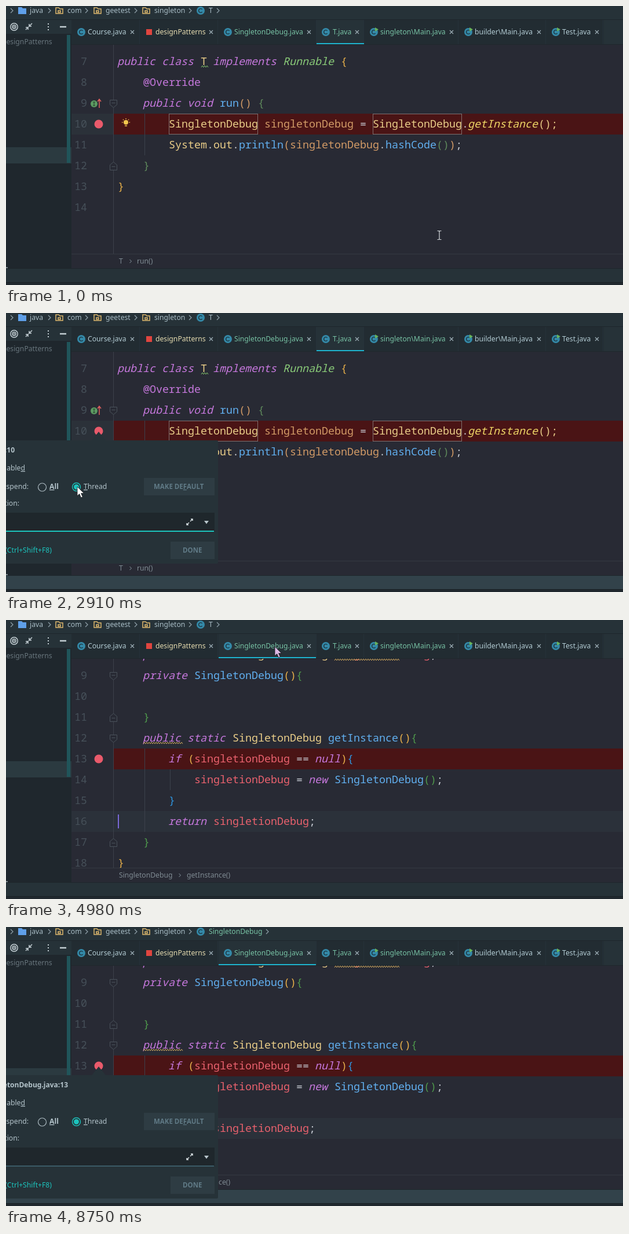
An HTML page that plays this animation: 1065x482 px, repeating every 8.93 s.

```html
<!DOCTYPE html>
<html lang="en">
<head>
<meta charset="utf-8">
<title>Breakpoint settings</title>
<style>
html, body { margin: 0; width: 100%; height: 100%; overflow: hidden; background: #282a34; }
svg { display: block; width: 1065px; height: 482px; }
text { font: 12.2px "Noto Sans", sans-serif; fill: #a9bdc6; white-space: pre; }
.code text { font: 18.333px "Noto Sans Mono", monospace; font-variant-ligatures: none; fill: #c8ccd4; }
.code .num { fill: #465059; text-anchor: end; }
.code .k { fill: #c678dd; }
.code .a { fill: #c678dd; }
.code .c { fill: #e9cd88; }
.code .i { fill: #efd666; }
.code .g { fill: #89ca78; }
.code .f { fill: #61afef; }
.code .r { fill: #e8616d; }
.code .o { fill: #d19a66; }
.code .y { fill: #e8b04a; }
.code .e { fill: #4f9a4c; }
.code .d { fill: #5f8a5c; }
.code .b { fill: #2f96e0; }
.code .k, .code .i, .code .g { font-style: italic; }
.wave, .line { fill: none; stroke-width: 1; }
.guide { stroke: #3c414b; }
.fold { fill: #282a34; stroke: #4a525b; }
.foot text { fill: #7f8b93; }
.popup text { fill: #b4c4cb; }
.popup .bold, .popup .button { font-weight: 700; }
.popup .button { fill: #607a86; font-size: 11.5px; }
.popup .end { text-anchor: end; }
.popup .link { fill: #1cc4bd; }
.under { text-decoration: underline; }
</style>
</head>
<body>
<svg viewBox="0 0 1065 482">
  <defs>
    <clipPath id="pane"><path d="M113 67H1065V428H113Z"/></clipPath>
    <g id="class">
      <circle r="7" fill="#3489a8"/>
      <path d="M2.6 -2.2A3.4 3.4 0 1 0 2.6 2.2" fill="none" stroke="#1d3540" stroke-width="1.4"/>
    </g>
    <path id="chevron" d="M-2 -4L2 0L-2 4" fill="none" stroke="#8b9ca5" stroke-width="1.3"/>
    <path id="folder" d="M-6 -5H-1L1 -3H6V5H-6ZM-2 0H2V3H-2Z" fill="none" stroke="#dcb66c" stroke-width="1.5"/>
    <path id="open" class="fold" d="M-6 -6H6V2L0 7L-6 2ZM-3 -1H3"/>
    <path id="shut" class="fold" d="M-6 7H6V-2L0 -7L-6 -2ZM-3 1H3"/>
    <circle id="point" r="7.5" fill="#e95a6b"/>
  </defs>

  <!-- window frame -->
  <rect width="1065" height="482" fill="#263238"/>
  <rect x="113" y="24" width="919" height="43" fill="#222c32"/>
  <rect x="113" y="67" width="952" height="386" fill="#282a34"/>
  <rect y="48" width="113" height="405" fill="#1f272d"/>
  <path d="M113 66.5H1065" stroke="#1f272c"/>
  <rect y="244" width="113" height="28" fill="#2b3a40"/>
  <rect x="105" y="50" width="6" height="221" fill="#20555a"/>
  <text x="-7" y="66" style="fill:#68767d">designPatterns</text>
  <path d="M0 23.5H1065M0 453.5H1065" stroke="#1e262b"/>
  <rect id="status" y="454" width="1065" height="23"/>
  <rect y="477" width="1065" height="5" fill="#20282e"/>
  <path d="M0 477.5H1065" stroke="#1b2226"/>
  <path d="M0 452H3" stroke="#7d898f" stroke-width="2"/>
  <g fill="none" stroke="#c3ced3" stroke-width="1.5">
    <circle cx="14" cy="36" r="6.2"/><circle cx="14" cy="36" r="3"/>
    <path d="M45 30L40 35V31M40 35H44M34 41L38 37V41M38 37H34"/>
    <path d="M73 30V32M73 35V37M73 40V42" stroke-width="2"/>
    <path d="M93 36H104" stroke-width="2.5"/>
  </g>
  <circle cx="14" cy="36" r="1.3" fill="#c3ced3"/>

  <!-- path bar -->
  <path d="M21 2H27L29 4H35V14H21Z" fill="#5f9fe8"/>
  <text x="41" y="12">java</text><text x="106" y="12">com</text>
  <text x="172" y="12">geetest</text><text x="256" y="12">singleton</text>
  <use href="#folder" x="92" y="8"/><use href="#folder" x="158" y="8"/><use href="#folder" x="242" y="8"/>
  <use href="#chevron" x="10" y="8"/><use href="#chevron" x="75" y="8"/><use href="#chevron" x="139" y="8"/>
  <use href="#chevron" x="224" y="8"/><use href="#chevron" x="318" y="8"/>
  <use href="#class" x="336" y="8"/>
  <g id="pathT"><text x="350" y="12">T</text><use href="#chevron" x="366" y="8"/></g>
  <g id="pathS"><text x="350" y="12" style="fill:#78c3a5">SingletonDebug</text><use href="#chevron" x="451" y="8"/></g>
  <g id="active">
    <rect y="24" width="100%" height="40" fill="#263238"/>
  </g>
  <g id="tabs"></g>
  <rect id="marker" y="64" height="2" fill="#1fb4cf"/>

  <!-- runnable class -->
  <g id="fileT">
    <g clip-path="url(#pane)">
      <rect x="113" y="186" width="73" height="36" fill="#2b3139"/>
      <rect x="186" y="186" width="879" height="36" fill="#4a1415"/>
      <path class="guide" d="M185.5 67V428M239.5 186V258"/>
      <use href="#open" x="185.5" y="168.5"/><use href="#shut" x="185.5" y="276.5"/>
      <circle cx="152" cy="169" r="6" fill="#5c9b62"/>
      <path d="M150 166H154M152 166V172M150 172H154" stroke="#24352a"/>
      <path d="M161 176V161M158 165L161 161L164 165" fill="none" stroke="#e0605f" stroke-width="1.5"/>
      <use id="pointT" href="#point" x="160" y="204"/>
      <g class="line" stroke="#80706f">
        <rect x="281.5" y="186.5" width="153" height="35"/><rect x="633.5" y="186.5" width="153" height="35"/>
      </g>
      <g class="code" id="codeT"></g>
    </g>
    <g id="bulb">
      <circle cx="207" cy="201" r="4" fill="#f3c74e"/>
      <path d="M205 207H209M207 194V195.500M200 201H201.500M212.500 201H214M202 196L203 197M212 196L211 197" stroke="#f3c74e" stroke-width="1.5"/>
    </g>
    <g class="foot">
      <text x="195" y="445">T</text><text x="226" y="445">run()</text>
      <use href="#chevron" transform="translate(215 441) scale(.75)"/>
    </g>
  </g>

  <!-- singleton class -->
  <g id="fileS">
    <g clip-path="url(#pane)">
      <rect x="186" y="222" width="879" height="36" fill="#4a1415"/>
      <rect x="113" y="330" width="952" height="36" fill="#2b313a"/>
      <path class="guide" d="M185.5 67V428M239.5 222V366M283.5 258V294"/>
      <use href="#open" x="185.5" y="96.5"/><use href="#shut" x="185.5" y="168.5"/>
      <use href="#open" x="185.5" y="204.5"/><use href="#shut" x="185.5" y="384.5"/>
      <use href="#point" x="160" y="240"/>
      <rect x="193" y="336" width="2" height="24" fill="#7a68d8"/>
      <g class="code" id="codeS"></g>
    </g>
    <g class="foot">
      <text x="195" y="445">SingletonDebug</text><text x="312" y="445">getInstance()</text>
      <use href="#chevron" transform="translate(300 441) scale(.75)"/>
    </g>
  </g>
  <path d="M113 428.5H1065" stroke="#343a42"/>

  <!-- breakpoint balloon -->
  <g id="popup" class="popup">
    <path d="M0 220H148L160 205L172 220H364Q366 220 366 222V431Q366 433 364 433H0Z" fill="#263238"/>
    <text id="title" class="bold end" y="241" style="font-size:12px"></text>
    <text class="end" x="33" y="272">Enable<tspan class="under">d</tspan></text>
    <text class="end" x="39" y="304">Suspend:</text>
    <text class="end" x="23" y="333">Condition:</text>
    <circle cx="62.500" cy="301" r="7" fill="none" stroke="#aebcc3" stroke-width="1.2"/>
    <text class="bold" x="75" y="304"><tspan class="under">A</tspan>ll</text>
    <circle id="glow" cx="121.500" cy="300.500" r="11" fill="#1b6e72"/>
    <circle cx="121.500" cy="300.500" r="7" fill="#263238" stroke="#1cc4bd" stroke-width="1.4"/>
    <circle cx="121.500" cy="300.500" r="4.500" fill="#1cc4bd"/>
    <text x="134" y="304"><tspan class="under">T</tspan>hread</text>
    <path d="M238 285H360V315H238ZM284 395H360V425H284Z" fill="#2e3c43"/>
    <text class="button" x="255" y="304">MAKE DE<tspan class="under">F</tspan>AULT</text>
    <text class="button" x="305" y="414">DONE</text>
    <rect y="345" width="360" height="32" fill="#1f272c"/>
    <rect id="field" y="376" width="359" height="2"/>
    <path d="M318 360L322 356M319 356H322V359M316 362L312 366M312 363V366H315" fill="none" stroke="#d5dde0" stroke-width="1.5"/>
    <path d="M342 359H350L346 364.500Z" fill="#b9c6cc"/>
    <text class="link end" x="79" y="414">More (Ctrl+Shift+F8)</text>
  </g>

  <g id="cursor">
    <circle id="ring" r="11.500" fill="#bda611" opacity=".9"/>
    <path id="arrow" d="M0 0V16L3.700 12.600L6.500 19L9.300 17.800L6.600 11.600H11.700Z" stroke="#15191c" stroke-width=".8"/>
    <path id="beam" d="M-3.500 -7.500H-1L0 -6.500L1 -7.500H3.500M0 -6.500V6.500M-3.500 7.500H-1L0 6.500L1 7.500H3.500" fill="none" stroke="#d6dade" stroke-width="1.2"/>
  </g>
</svg>
<script>
const LOOP = 8930;
const CHAR = 11;
const ITALIC = 'kig';
const $ = id => document.getElementById(id);

function set(id, attributes) {
  for (const name in attributes) $(id).setAttribute(name, attributes[name]);
}

// Each part of a row is a colour class letter followed by its text.
function row(first, n, indent, parts) {
  const y = 102 + (n - first) * 36;
  let x = 193 + indent * CHAR;
  let out = `<text class="num" x="140" y="${y}">${n}</text>`;
  for (const part of parts.split('|')) {
    const kind = part[0], word = part.slice(1);
    const lean = ITALIC.includes(kind) ? 1 : 0;
    out += `<text class="${kind}" x="${x - lean}" y="${y}">${word}</text>`;
    x += word.length * CHAR;
  }
  return out;
}

function wave(x, y, width, color) {
  const steps = 'l2 -3l2 3'.repeat(Math.round(width / 4));
  return `<path class="wave" stroke="${color}" d="M${x} ${y}${steps}"/>`;
}

$('codeT').innerHTML = [
  [7, 0, 'kpublic class |cT|k implements |gRunnable |y{'],
  [8, 4, 'a@Override'],
  [9, 4, 'kpublic void |frun|o() |d{'],
  [10, 8, 'cSingletonDebug |osingletonDebug |w= |cSingletonDebug|w.|igetInstance|c();'],
  [11, 8, 'cSystem|w.|cout|w.|fprintln|o(singletonDebug|w.|fhashCode|d()|o)|w;'],
  [12, 4, 'd}'],
  [13, 0, 'y}'],
  [14, 0, 'w']
].map(r => row(7, ...r)).join('') + wave(337, 106, 11, '#7fbf6a');

$('codeS').innerHTML = [
  [8, 4, 'kprivate static |cSingletonDebug |rsingletionDebug|w;'],
  [9, 4, 'kprivate |fSingletonDebug|y()|e{'],
  [10, 0, 'w'],
  [11, 4, 'e}'],
  [12, 4, 'kpublic static |cSingletonDebug |fgetInstance|y()|e{'],
  [13, 8, 'kif |y(|rsingletionDebug |w== |knull|y)|b{'],
  [14, 12, 'rsingletionDebug |w= |knew |fSingletonDebug|e()|w;'],
  [15, 8, 'b}'],
  [16, 8, 'kreturn |rsingletionDebug|w;'],
  [17, 4, 'e}'],
  [18, 0, 'y}']
].map(r => row(9, ...r)).join('') + wave(237, 214, 66, '#c9a45c') + wave(567, 70, 110, '#c9a45c');

// label, icon x, text x, close x, right edge, colour, icon kind
const BLUE = '#b3ccd4', GREEN = '#78c3a5';
$('tabs').innerHTML = [
  ['Course.java', 130, 141, 218, 231, BLUE],
  ['designPatterns', 247, 258, 354, 366, '#e6dcb0', 'square'],
  ['SingletonDebug.java', 383, 394, 523, 536, GREEN],
  ['T.java', 552, 564, 606, 618, GREEN],
  ['singleton\\Main.java', 635, 646, 769, 781, GREEN, 'main'],
  ['builder\\Main.java', 798, 809, 920, 932, BLUE, 'main'],
  ['Test.java', 949, 960, 1020, 1031, BLUE, 'main']
].map(([label, icon, x, close, edge, color, kind]) =>
  (kind === 'square'
    ? `<rect x="${icon - 5}" y="40" width="10" height="10" fill="#e0453f"/>`
    : `<use href="#class" x="${icon}" y="45"/>`) +
  (kind === 'main' ? `<path d="M${icon + 2} 37V44L${icon + 8} 40.500Z" fill="#67b35c"/>` : '') +
  `<text x="${x}" y="49" style="fill:${color}">${label}</text>
   <path d="M${close - 3} 42l6 6m0 -6l-6 6" stroke="#9fb0b8" stroke-width="1.2"/>
   <path d="M${edge - .5} 24V66" stroke="#26323a"/>`).join('');

// start time, x, y, pointer look
const MOVES = [
  [0, 748, 396, 'beam'], [170, 722, 386, 'beam'], [340, 600, 346, 'beam'], [510, 396, 270, 'beam'],
  [680, 178, 204], [850, 157, 197],
  [2220, 162, 212], [2390, 169, 250], [2570, 140, 312], [2740, 118, 306], [2910, 123, 300],
  [3420, 123, 300, 'ring'], [3600, 123, 300], [3770, 136, 290], [3940, 220, 236], [4120, 340, 160],
  [4290, 440, 100], [4460, 487, 70], [4630, 464, 46], [4810, 464, 46, 'ring'], [4980, 464, 46, 'tint'],
  [5150, 440, 72], [5330, 300, 220], [5500, 183, 341], [5680, 172, 290], [5850, 160, 240],
  [6360, 158, 262], [6530, 135, 320], [6700, 123, 336], [6870, 123, 336, 'ring'], [7040, 123, 336],
  [7210, 258, 331], [7390, 846, 441], [7560, 0, 0, 'none']
];

const show = (id, on) => set(id, { display: on ? 'inline' : 'none' });

function draw(t) {
  const within = (from, to) => t >= from && t < to;
  const second = t >= 4980;
  const asking = within(1360, 4980) || t >= 6180;

  show('fileT', !second);
  show('fileS', second);
  show('pathT', t < 5150);
  show('pathS', t >= 5150);
  show('bulb', t < 1360);
  const tab = second ? { x: 367, width: 168 } : { x: 536, width: 82 };
  set('marker', tab);
  $('active').firstElementChild.setAttribute('x', tab.x);
  $('active').firstElementChild.setAttribute('width', tab.width);
  set('pointT', { opacity: within(1360, 1710) ? .6 : 1 });

  show('popup', asking);
  set('status', { fill: asking ? '#32424a' : '#263238' });
  set('popup', { transform: `translate(0 ${second ? 36 : 0})` });
  $('title').textContent = second ? 'SingletonDebug.java:13' : 'T.java:10';
  set('title', { x: second ? 107 : 15 });
  show('glow', within(3420, 4980) || within(6870, 8750));
  set('field', { fill: within(1710, 3420) || within(6530, 6870) ? '#1cc4bd' : '#3b5b67' });

  const [, x, y, look] = MOVES.findLast(m => m[0] <= t);
  set('cursor', { transform: `translate(${x} ${y})` });
  show('cursor', look !== 'none');
  show('ring', look === 'ring');
  show('beam', look === 'beam');
  show('arrow', look !== 'beam');
  set('arrow', { fill: look === 'tint' ? '#dcb9e4' : '#fff' });
}

const start = performance.now();
function tick() {
  draw((performance.now() - start) % LOOP);
  requestAnimationFrame(tick);
}
tick();
</script>
</body>
</html>
```
